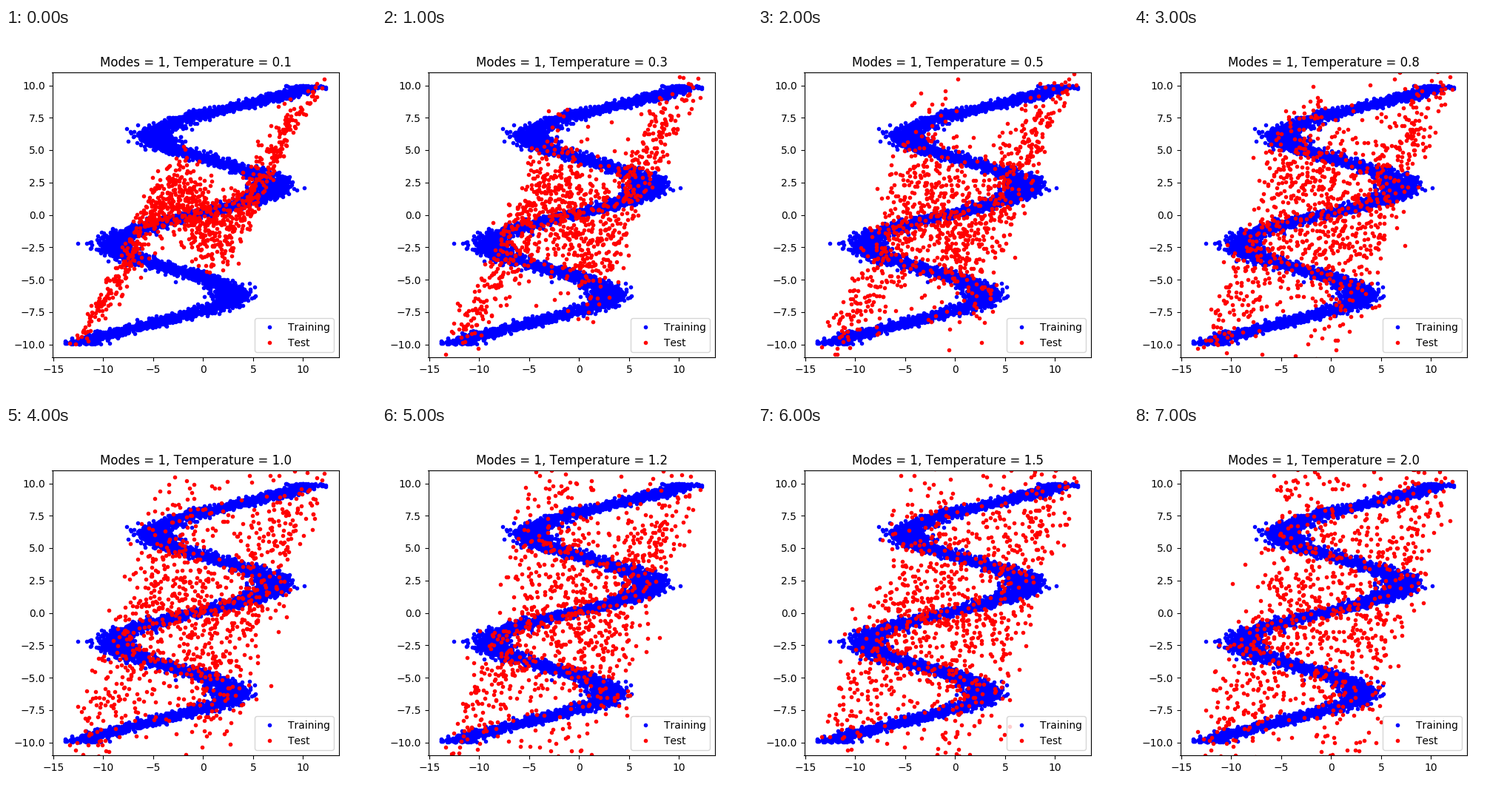
These frames come from a looping animation (500x500 px, 8 s). A matplotlib script:

```python
import numpy as np
import matplotlib.pyplot as plt
from matplotlib.animation import FuncAnimation

TEMPERATURES = [0.1, 0.3, 0.5, 0.8, 1.0, 1.2, 1.5, 2.0]
N_TRAIN, N_TEST = 5000, 1000
X_MIN, X_MAX = -13.8, 12.3
CENTER = -0.7

plt.rcParams["text.kerning_factor"] = 6


def zigzag(rng, n):
    """Noisy points along a sine wave that runs up the y axis."""
    y = rng.uniform(-10, 10, n)
    x = 7 * np.sin(0.75 * y) + 0.5 * y - 1 + rng.normal(0, 1, n)
    return np.clip(x, X_MIN, X_MAX), y


def predict(x, temperature, rng):
    """Draw y from one normal mode whose variance grows with temperature."""
    u = x - CENTER
    mean = 0.8 * u - 1.6 * u * np.exp(-(u / 3.7) ** 2 / 2)
    spread = 5.6 - 0.36 * np.abs(u)
    return mean + spread * np.sqrt(temperature) * rng.normal(size=x.size)


rng = np.random.default_rng(4)
train_x, train_y = zigzag(rng, N_TRAIN)
test_x = rng.triangular(X_MIN, CENTER, X_MAX, N_TEST)

fig, ax = plt.subplots(figsize=(5, 5), dpi=100)
ax.plot(train_x, train_y, "b.", label="Training")
test_dots, = ax.plot([], [], "r.", label="Test")
margin = 0.05 * (X_MAX - X_MIN)
ax.set_xlim(X_MIN - margin, X_MAX + margin)
ax.set_ylim(-11, 11)
ax.legend(loc="lower right")
title = ax.set_title("")


def update(i):
    temperature = TEMPERATURES[i]
    noise = np.random.default_rng(100 + i)
    test_dots.set_data(test_x, predict(test_x, temperature, noise))
    title.set_text(f"Modes = 1, Temperature = {temperature}")
    return test_dots, title


anim = FuncAnimation(fig, update, frames=len(TEMPERATURES), interval=1000,
                     repeat=True, repeat_delay=0)
plt.show()
```
